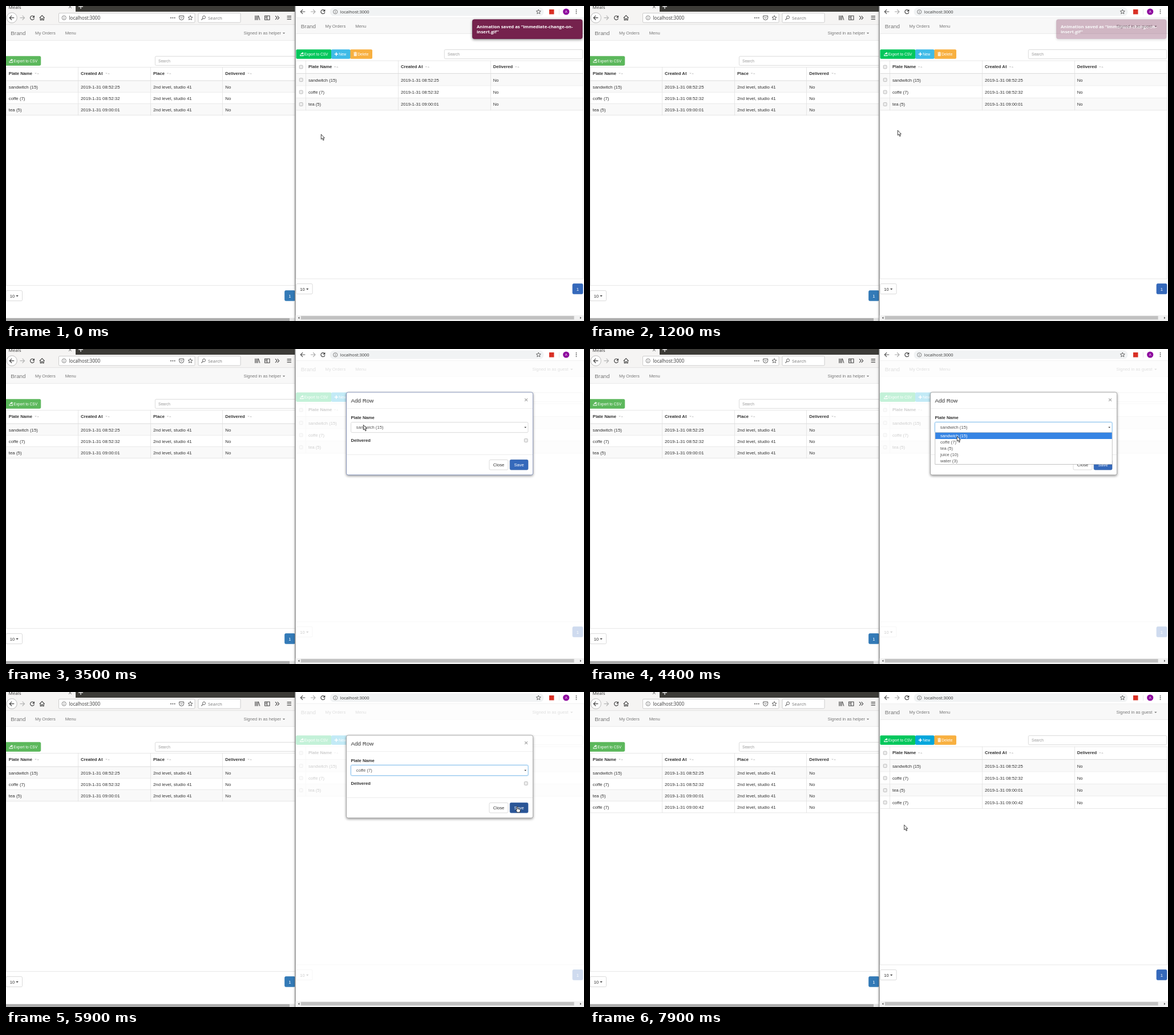
Write an HTML page that moves like this. It is 1013 by 553 pixels and loops after 8000 ms.

```html
<!DOCTYPE html>
<html lang="en">
<head>
<meta charset="utf-8">
<title>Order table</title>
<style>
  html, body { margin: 0; width: 100%; height: 100%; overflow: hidden; background: #fff; }
  svg { display: block; width: 100vw; height: 100vh; }
  text { font-family: "Liberation Sans", Arial, sans-serif; white-space: pre; }
  .ui { font-family: "Open Sans", "Noto Sans", sans-serif; }
</style>
</head>
<body>
<svg id="stage" viewBox="0 0 1013 553" preserveAspectRatio="none"></svg>
<script>
const LOOP = 8000;
const BASE = 7.67, SMALL = 6.6, WIDE = 7.87;

// Drawing helpers, each returning SVG markup
const rect = (x, y, w, h, fill, stroke = 'none', r = 0, more = '') =>
  `<rect x="${x}" y="${y}" width="${w}" height="${h}" rx="${r}" fill="${fill}" stroke="${stroke}" stroke-width=".7" ${more}/>`;
const text = (x, y, str, size = BASE, fill = '#333', more = '') =>
  `<text x="${x}" y="${y}" font-size="${size}" fill="${fill}" ${more}>${str}</text>`;
const bold = (x, y, str) => text(x, y, str, BASE, '#333', 'font-weight="700"');
const path = (d, stroke = '#444', width = 1.1, fill = 'none', more = '') =>
  `<path d="${d}" fill="${fill}" stroke="${stroke}" stroke-width="${width}" ${more}/>`;
const fillPath = (d, fill) => path(d, 'none', 0, fill);
const circle = (x, y, r, fill, stroke = 'none', width = .8) =>
  `<circle cx="${x}" cy="${y}" r="${r}" fill="${fill}" stroke="${stroke}" stroke-width="${width}"/>`;
const group = (id, body, more = '') => `<g id="${id}" ${more}>${body}</g>`;
const hline = (x, y, w, color = '#ddd', h = .7) => rect(x, y, w, h, color);
const vline = (x, y, h, color = '#ddd') => rect(x, y, .7, h, color);
const caret = (x, y, fill = '#777', s = 2.2) => fillPath(`M${x - s} ${y - s / 2}h${2 * s}l${-s} ${s}z`, fill);
const sorter = (x, y) => caret(x, y, '#ccc', 1.9) + fillPath(`M${x + 2.2} ${y + 1}h3.8l-1.9 -1.9z`, '#ccc');
const checkbox = (x, y) => rect(x - 2.9, y - 2.9, 5.8, 5.8, '#eee', '#a5a5a5', 1);
const times = n => Array.from({ length: n }, (_, i) => i);

// Browser icons
const arrow = (x, y, dir, color) =>
  path(`M${x - 4 * dir} ${y}h${8 * dir}m${-3.8 * dir} -3.8l${3.8 * dir} 3.8l${-3.8 * dir} 3.8`, color, 1.2);
const reload = (x, y) =>
  path(`M${x + 3} ${y - 1.8}A3.5 3.5 0 1 0 ${x + 3.4} ${y + 1}`, '#444', 1.2) +
  fillPath(`M${x + 4} ${y - 4.2}v4h-4z`, '#444');
const info = (x, y) => circle(x, y, 3.6, 'none', '#666') +
  rect(x - .4, y - .6, .8, 2.6, '#666') + rect(x - .4, y - 2, .8, .9, '#666');
const star = (x, y) => {
  const points = times(10).map(i => {
    const r = i % 2 ? 1.9 : 4.2, a = i * Math.PI / 5;
    return `${(x + r * Math.sin(a)).toFixed(2)} ${(y - r * Math.cos(a)).toFixed(2)}`;
  });
  return path(`M${points.join('L')}Z`, '#555', .9);
};
const exportIcon = (x, y) =>
  fillPath(`M${x - 3.3} ${y + 1}h1v1.2h4.6v-1.2h1v2.4h-6.6zM${x - 2} ${y + 1}q0 -3 3 -3.2v-1.4l2.4 2.2l-2.4 2.2v-1.3q-2 0 -3 1.5z`, '#fff');

const menuBar = (x, y, w, h, name, nameEnd, caretX) => {
  const base = y + h / 2 + .3;
  return rect(x, y, w, h, '#f8f8f8') + hline(x, y + h - .6, w, '#e4e4e4') +
    text(x + 8.3, base + 3.2, 'Brand', 9.86, '#777') +
    text(x + 51, base + 2.6, 'My Orders', BASE, '#777') +
    text(x + 103.7, base + 2.6, 'Menu', BASE, '#777') +
    text(nameEnd, base + 2.6, 'Signed in as ' + name, BASE, '#777', 'text-anchor="end"') +
    caret(caretX, base + .4);
};

const pager = (x, y, end, color) =>
  rect(x, y, 28.5, 18, '#fff', '#ccc', 2) + text(x + 6.7, y + 11.9, '10') + caret(x + 19.6, y + 9.6, '#333') +
  rect(end - 18, y, 18, 18, color, color, 2) + text(end - 11.2, y + 11.9, '1', BASE, '#fff');

const orders = [
  ['sandwitch (15)', '2019-1-31 08:52:25'],
  ['coffe (7)', '2019-1-31 08:52:32'],
  ['tea (5)', '2019-1-31 09:00:01'],
  ['coffe (7)', '2019-1-31 09:00:42'],
];

// A table: columns are [x, title, sorter x]; the last order stays in its own group
function table(t) {
  const end = t.x + t.w;
  const head = hline(t.x, t.top, t.w) + t.columns.map(([x, title, sx]) =>
    bold(x, t.headBase, title) + sorter(sx, t.headBase - 2.3)).join('') +
    t.lines.map(x => vline(x, t.top, t.first - t.top)).join('') + hline(t.x, t.first - 1.1, t.w, '#ddd', 1.1);
  const rows = orders.map((order, i) => {
    const y = t.first + i * t.step;
    const cells = t.columns.map(([x], c) => text(x, y + t.step / 2 + 2.9, t.cells(order)[c], t.size)).join('');
    const body = rect(t.x, y, end - t.x, t.step, i % 2 ? '#fff' : '#f9f9f9') + cells +
      t.lines.map(x => vline(x, y, t.step)).join('') +
      (t.check ? checkbox(t.check, y + t.step / 2) : '') + hline(t.x, y + t.step - .6, t.w);
    return i === 3 ? `<g class="added">${body}</g>` : body;
  });
  return rows.join('') + head;
}

const leftWindow =
  rect(0, 0, 507, 11, '#3c3b37') + rect(0, 0, 122, 12, '#f5f4f3') + rect(0, 10, 507, 23, '#f5f4f3') +
  text(4.5, 4.6, 'Meals', 8, '#333', 'class="ui"') +
  path('M110 -.8l4.6 4.6m0 -4.6l-4.6 4.6', '#555', 1) + path('M127 1h8m-4 -4v8', '#ddd', 1.4) +
  hline(0, 32.6, 507, '#ccc') +
  rect(92.5, 12.5, 238.5, 16.5, '#fff', '#bbb', 1.5) + rect(337, 12.5, 74, 16.5, '#fff', '#bbb', 1.5) +
  circle(10.3, 20.7, 9, '#fff', '#aaa') + arrow(10.3, 20.7, -1, '#444') + arrow(28.5, 20.7, 1, '#b5b5b5') +
  reload(46, 20.7) + path('M58.8 20.8l4.4 -4.2l4.4 4.2M60.2 20v4.6h2v-2.6h2v2.6h2v-4.6', '#444', 1.1) +
  info(101.7, 20.7) + text(110.5, 23.7, 'localhost:3000', 8.1, '#333', 'class="ui"') +
  times(3).map(i => circle(289 + i * 3.3, 20.7, 1, '#555')).join('') +
  path('M303.6 17.3h8v3.2a4 4 0 0 1 -8 0zM305.6 19.6l2 1.9l2 -1.9', '#555', 1) + star(323, 20.9) +
  circle(347, 19.8, 2.5, 'none', '#666', 1) + path('M345.2 21.7l-2.8 2.8', '#666', 1.2) +
  text(354, 23.7, 'Search', 7.9, '#777', 'class="ui"') +
  path('M436.8 16.7v8m2.2 -8v8m2.2 -8v8m1.2 -7.8l2.4 7.8', '#444', 1.1) +
  path('M453.6 17.2h8.4v7h-8.4zM457.5 17.2v7M454.8 19.2h1.6m-1.6 1.8h1.6', '#444', 1.1) +
  path('M472 17.4l3 3.3l-3 3.3m3.6 -6.6l3 3.3l-3 3.3', '#444', 1.1) +
  path('M492.6 17.9h7.4m-7.4 2.8h7.4m-7.4 2.8h7.4', '#444', 1.1) +
  menuBar(0, 33.3, 507, 27.6, 'helper', 482, 487) +
  rect(-3, 88.3, 63.8, 16, '#5cb85c', '#4cae4c', 2) + exportIcon(8.7, 96.2) +
  text(13.3, 98.7, 'Export to CSV', SMALL, '#fff') +
  rect(261.4, 88.3, 260, 16, '#fff', '#ccc', 2) + text(267, 98.7, 'Search', SMALL, '#999') +
  table({
    x: 0, w: 507, top: 107.2, first: 131.6, step: 20.15, headBase: 120.8, size: WIDE,
    lines: [0, 126.2, 253, 379.3],
    columns: [[4.8, 'Plate Name', 52], [131, 'Created At', 176], [258, 'Place', 283.5], [384.3, 'Delivered', 425]],
    cells: ([plate, date]) => [plate, date, '2nd level, studio 41', 'No'],
  }) +
  vline(0, 107, 383) + hline(0, 490, 507) + pager(0, 499.6, 506.5, '#337ab7') +
  rect(0, 547.6, 507, 5.4, '#e3e3e3') + rect(0, 548, 497, 5, '#adadad');

const button = (x, w, fill, icon, label, labelX, id = '') =>
  rect(x, 76.3, w, 16.4, fill, 'none', 2, id && `id="${id}"`) + icon + text(labelX, 87, label, SMALL, '#fff');

const rightChrome =
  rect(503, 0, 3.5, 553, '#000', 'none', 0, 'opacity=".06"') +
  rect(506.3, 0, 506.7, 553, '#fff') + rect(506.2, 0, 1.2, 553, '#666') +
  arrow(520.3, 10, -1, '#555') + arrow(538, 10, 1, '#aaa') + reload(555.4, 10) +
  rect(567.5, 2.6, 375, 15, '#f1f3f4', 'none', 7.5) + info(577.2, 10.2) +
  text(585.8, 13, 'localhost:3000', 7.55, '#333', 'class="ui"') +
  star(933.3, 10.2) + rect(952, 6, 8.5, 8.5, '#d93025') + vline(969, 5.5, 9.5, '#ddd') +
  circle(981.7, 10, 5.6, '#8e0a9e') + text(981.7, 12.1, 'A', 5.8, '#fff', 'text-anchor="middle"') +
  times(3).map(i => circle(999.5, 6.9 + i * 3.1, .95, '#555')).join('') + hline(507.4, 20.6, 506, '#ddd');

const rightPage =
  menuBar(508.5, 21.3, 504.5, 27.6, 'guest', 985.5, 991.3) +
  button(508.4, 62, '#04c75c', exportIcon(518.4, 84.4), 'Export to CSV', 522.7) +
  button(603, 39, '#f8b040', fillPath('M609.2 81.6h2v-.9h2v.9h2v1h-6zM609.8 83.2h4.8v4.6h-4.8z', '#fff') +
    path('M611.3 84v3m1.8 -3v3', '#f8b040', .5), 'Delete', 616.3) +
  button(570, 33.4, '#3fbbe7', path('M575.7 84.5h6.2m-3.1 -3.1v6.2', '#fff', 1.6), 'New', 583.2, 'newButton') +
  rect(768.3, 76.6, 242.5, 16, '#fff', '#ccc', 2) + text(774, 87, 'Search', SMALL, '#999') +
  table({
    x: 508.5, w: 503, top: 95.7, first: 119, step: 21.4, headBase: 109.3, size: BASE, check: 517.2,
    lines: [525.2, 687.2, 849.2],
    columns: [[530, 'Plate Name', 576.6], [692, 'Created At', 736.3], [853.8, 'Delivered', 893.8]],
    cells: ([plate, date]) => [plate, date, 'No'],
  }) + checkbox(517.2, 107) +
  vline(508.2, 95.7, 383.3) + vline(1011, 95.7, 383.3) + hline(508.2, 478.6, 503.3) +
  pager(508.6, 487.6, 1011, '#3569bb');

const scrollbar = rect(507.4, 543, 506, 10, '#f1f1f1') + rect(516.8, 544.2, 478.8, 6.2, '#c1c1c1') +
  fillPath('M514.3 545.4v4l-2.4 -2zM1006 545.4v4l2.4 -2z', '#555');

const toast = group('toast',
  rect(817.5, 23.8, 192.5, 33.6, '#74204e', '#5c183d', 3, 'filter="url(#shadow)"') +
  ['Animation saved as “immediate-change-on-', 'insert.gif”'].map((line, i) =>
    text(825, 38.6 + i * 9.6, line, 7.75, '#fff', 'class="ui" font-weight="700"')).join(''));

const options = ['sandwich (15)', 'coffe (7)', 'tea (5)', 'juice (10)', 'water (3)'];
const dropdown = group('dropdown',
  rect(604.8, 146.8, 310.4, 55.6, '#fff', '#aaa') + rect(605.2, 147, 309.6, 11, '#3584e4', 'none', 0, 'id="marker"') +
  options.map((label, i) => text(614, 155.2 + i * 11, label, BASE, '#555', 'class="option"')).join(''));

const modal = group('modal',
  rect(508.2, 21, 504, 522, '#fff', 'none', 0, 'opacity=".76"') +
  rect(596.6, 76, 327, 145, '#fff', '#5d6fa3', 3, 'id="frame" filter="url(#shadow)"') +
  text(604.4, 94, 'Add Row', 9.86) + text(908.2, 93, '×', 11.5, '#aaa', 'font-weight="700"') +
  hline(597, 104.2, 326, '#e8e8e8') + bold(604.5, 122.8, 'Plate Name') +
  rect(603.6, 127.6, 312.4, 20, 'none', '#66afe9', 3, 'id="glow" opacity=".4"') +
  rect(604.6, 128.6, 310.4, 18, '#fff', '#ccc', 2, 'id="select"') +
  text(613.8, 140.4, '', BASE, '#555', 'id="choice"') + caret(910.2, 137.8, '#333', 1.9) +
  bold(604.5, 163.3, 'Delivered') + checkbox(911.3, 160.5) + hline(597, 185.2, 326, '#e5e5e5') +
  rect(847, 194.5, 33, 17.6, '#fff', '#ccc', 2, 'id="close"') + text(853.7, 206, 'Close') +
  rect(883.2, 194.5, 31.8, 17.6, '#3569bb', '#2d5ba3', 2, 'id="save"') + text(890.4, 206, 'Save', BASE, '#fff') +
  dropdown);

const pointer = group('pointer',
  path('M.3 .3V9L2.3 7.2L3.8 10.8L5.3 10.1L3.8 6.8H6.4Z', '#111', .8, '#fff', 'id="arrow"') +
  path('M-.8 .8q1 -1.4 1.8 0V4.2l3.4 .8q1.2 .4 1 1.6l-.7 3.6H-.2L-2.4 6.6q0 -1.2 1.6 -.4Z', '#111', .8, '#fff', 'id="hand"'));

const stage = document.getElementById('stage');
stage.innerHTML = `<defs><filter id="shadow" x="-10%" y="-20%" width="120%" height="140%">
  <feDropShadow dx="0" dy="1.6" stdDeviation="2" flood-color="#000" flood-opacity=".45"/></filter></defs>` +
  leftWindow + rightChrome + rightPage + scrollbar + modal + toast + pointer;

// Timelines: each entry holds from its time until the next
const pointerSteps = [
  [0, 552, 225], [600, 550, 224], [700, 546, 222], [800, 542, 220], [900, 540, 218.5], [1000, 539, 218],
  [1600, 556, 206], [1700, 634, 160], [1800, 699, 118], [1900, 660, 98], [2000, 606, 88], [2100, 585, 85, 'hand'],
  [3500, 626, 133], [3700, 628, 135], [4200, 628, 137], [4400, 643, 153], [4700, 643, 160],
  [5300, 806, 184], [5600, 872, 200, 'hand'], [5900, 896, 201, 'hand'],
  [6600, 675, 242], [6800, 626, 247], [7100, 616, 247], [7300, 602, 247], [7500, 558, 233], [7900, 550.4, 233],
];
const toastSteps = [[0, 1], [900, .97], [1000, .93], [1100, .65], [1200, .3], [1300, 0]];
const dropdownSteps = [[0, 0], [4200, 1], [5100, .5], [5300, 0]];
const stepAt = (steps, t) => steps.findLast(step => step[0] <= t);

const el = id => document.getElementById(id);
const set = (id, name, value) => el(id).setAttribute(name, value);
const show = (node, on) => { node.style.display = on ? '' : 'none'; };
const added = document.querySelectorAll('.added'), labels = document.querySelectorAll('.option');

function draw(t) {
  const [, x, y, shape = 'arrow'] = stepAt(pointerSteps, t);
  set('pointer', 'transform', `translate(${x} ${y})`);
  show(el('arrow'), shape === 'arrow');
  show(el('hand'), shape === 'hand');
  set('toast', 'opacity', stepAt(toastSteps, t)[1]);
  set('newButton', 'fill', t < 2100 ? '#3fbbe7' : '#02a6dc');

  const focused = t >= 4200, marked = t < 4700 ? 0 : 1;
  show(el('modal'), t >= 3500 && t < 6600);
  set('frame', 'stroke', focused ? '#888' : '#5d6fa3');
  show(el('glow'), focused);
  set('select', 'stroke', focused ? '#66afe9' : '#ccc');
  el('choice').textContent = options[t < 5100 ? 0 : 1];
  set('dropdown', 'opacity', stepAt(dropdownSteps, t)[1]);
  set('marker', 'y', 147 + marked * 11);
  labels.forEach((label, i) => label.setAttribute('fill', i === marked ? '#fff' : '#555'));
  set('close', 'fill', t >= 5600 && t < 5900 ? '#e6e6e6' : '#fff');
  set('save', 'fill', t >= 5900 ? '#2a5596' : '#3569bb');
  added.forEach(row => show(row, t >= 6600));
}

function tick() {
  draw(performance.now() % LOOP);
  requestAnimationFrame(tick);
}
tick();
</script>
</body>
</html>
```
